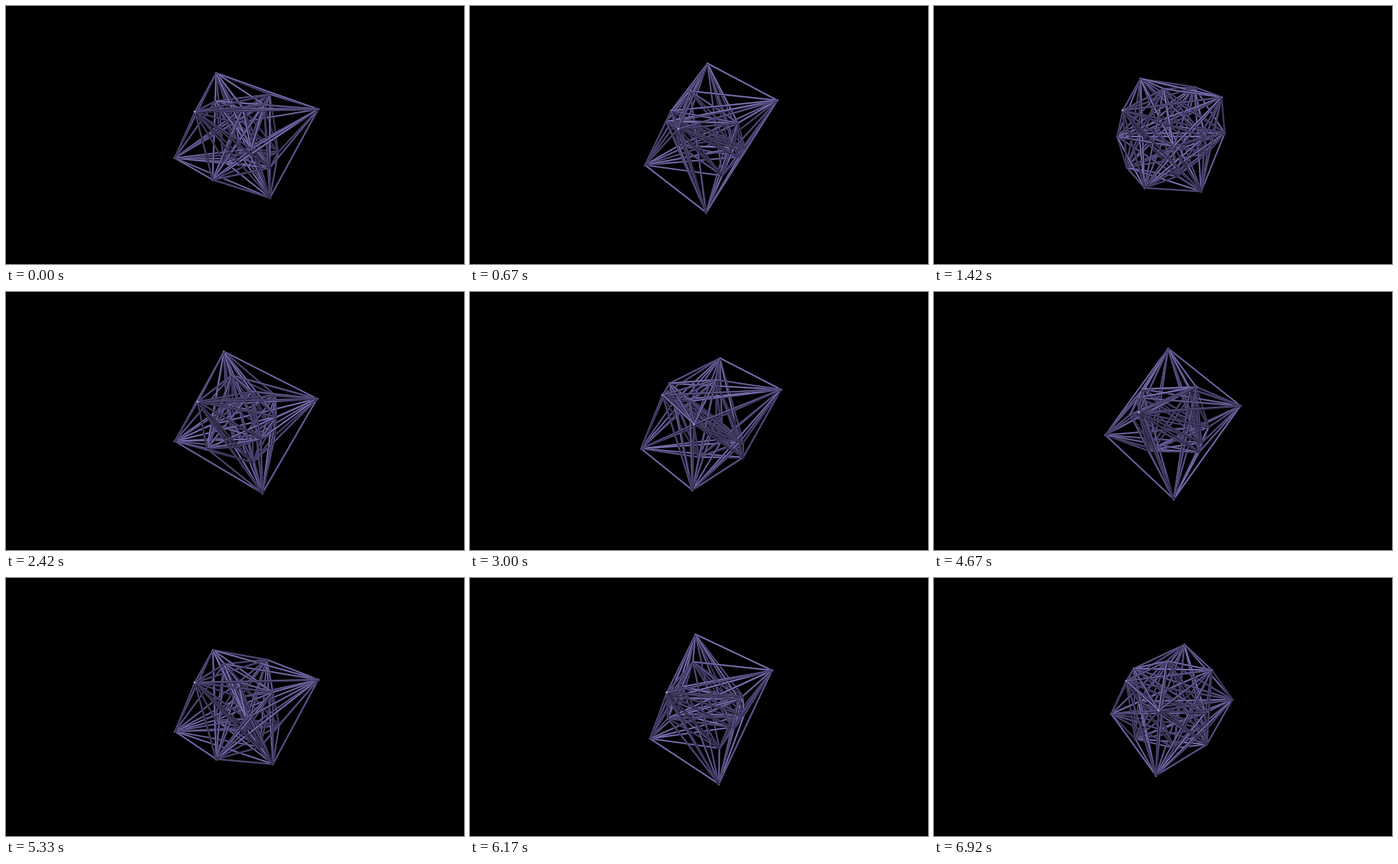
An HTML page with a canvas that plays this animation: 640 px wide and 360 px high, repeating every 7000 ms.

```html
<!DOCTYPE html>
<html lang="en">
<head>
<meta charset="utf-8">
<title>Rotating cross-polytope</title>
<style>
  html, body { margin: 0; width: 100%; height: 100%; overflow: hidden; background: #000; }
  canvas { display: block; width: 640px; height: 360px; }
</style>
</head>
<body>
<canvas id="stage" width="640" height="360"></canvas>
<script>
const ctx = document.getElementById('stage').getContext('2d');
const LOOP = 7000, FPS = 12;
const CENTER = [331, 180], CAMERA = 770;

// Each plane carries four vertices: +-u and +-v, turning by rate per step.
// Vectors are x, y in pixels and depth as a fraction of the camera distance.
const PLANES = [
  { u: [40, -59.5, -0.05], v: [-37.5, -87, -0.01], rate: 0.1, start: 0 },
  { u: [100, -34, 0.05], v: [0, -35, 0.05], rate: 0.05, start: 0 },
  { u: [-57, -27.5, 0.147], v: [-11, -18, -0.08], rate: 0.1, start: 0 },
  { u: [9.5, 61, -0.05], v: [46, 2, 0.04], rate: 0.1414, start: 0.733 }
];

const LIGHT = unit([-0.35, -0.5, 0.8]);

function unit(a) {
  const n = Math.hypot(...a);
  return a.map(c => c / n);
}

function project([x, y, z]) {
  const scale = 1 / (1 - z);
  return { x: CENTER[0] + x * scale, y: CENTER[1] + y * scale, z, scale, p: [x, y, z * CAMERA] };
}

// Vertices come in antipodal pairs: 2k and 2k + 1.
function vertices(step) {
  const out = [];
  for (const { u, v, rate, start } of PLANES) {
    for (const turn of [0, Math.PI / 2]) {
      const a = start + rate * step + turn;
      const w = u.map((c, i) => c * Math.cos(a) + v[i] * Math.sin(a));
      out.push(project(w), project(w.map(c => -c)));
    }
  }
  return out;
}

function line(a, b, dx, dy, width, color) {
  ctx.lineWidth = width;
  ctx.strokeStyle = color;
  ctx.beginPath();
  ctx.moveTo(a.x + dx, a.y + dy);
  ctx.lineTo(b.x + dx, b.y + dy);
  ctx.stroke();
}

function shade(base, k) {
  return `rgb(${base.map(c => Math.round(Math.min(255, c * k))).join(',')})`;
}

function tube({ a, b, z }) {
  const dir = unit(a.p.map((c, i) => b.p[i] - c));
  const along = dir.reduce((s, c, i) => s + c * LIGHT[i], 0);
  const lit = Math.sqrt(Math.max(0, 1 - along * along));
  const gloss = lit ** 10;
  const size = 1 / (1 - z);

  // The highlight sits on the side that faces the light.
  const len = Math.hypot(dir[0], dir[1]) || 1;
  let nx = -dir[1] / len, ny = dir[0] / len;
  if (nx * LIGHT[0] + ny * LIGHT[1] < 0) { nx = -nx; ny = -ny; }

  line(a, b, 0, 0, 2.7 * size, shade([48, 41, 78], 0.5 + 0.4 * lit));
  line(a, b, nx * 0.2, ny * 0.2, 1.7 * size, shade([94, 82, 142], 0.5 + 0.5 * lit));
  line(a, b, nx * 0.4, ny * 0.4, 0.7 * size, shade([150, 139, 198], 0.55 + 0.65 * gloss));
}

function ball(v) {
  const r = 1.8 * v.scale;
  for (const [shift, size, color] of [[0, r, '#5d5290'], [-0.4, r * 0.5, '#c9c3e6']]) {
    ctx.fillStyle = color;
    ctx.beginPath();
    ctx.arc(v.x + shift, v.y + shift, size, 0, 2 * Math.PI);
    ctx.fill();
  }
}

function draw(step) {
  ctx.fillStyle = '#000';
  ctx.fillRect(0, 0, 640, 360);
  const points = vertices(step);
  const parts = points.map(v => ({ z: v.z, paint: () => ball(v) }));
  points.forEach((a, i) => points.forEach((b, j) => {
    if (j <= i || j === (i ^ 1)) return;
    const z = (a.z + b.z) / 2;
    parts.push({ z, paint: () => tube({ a, b, z }) });
  }));
  parts.sort((s, t) => s.z - t.z).forEach(part => part.paint());
}

const begin = performance.now();
let shown = -1;

function tick() {
  const t = Math.max(0, performance.now() - begin) % LOOP;
  const step = Math.floor((t + 5) * FPS / 1000) % (LOOP * FPS / 1000);
  if (step !== shown) draw(shown = step);
  requestAnimationFrame(tick);
}
tick();
</script>
</body>
</html>
```
